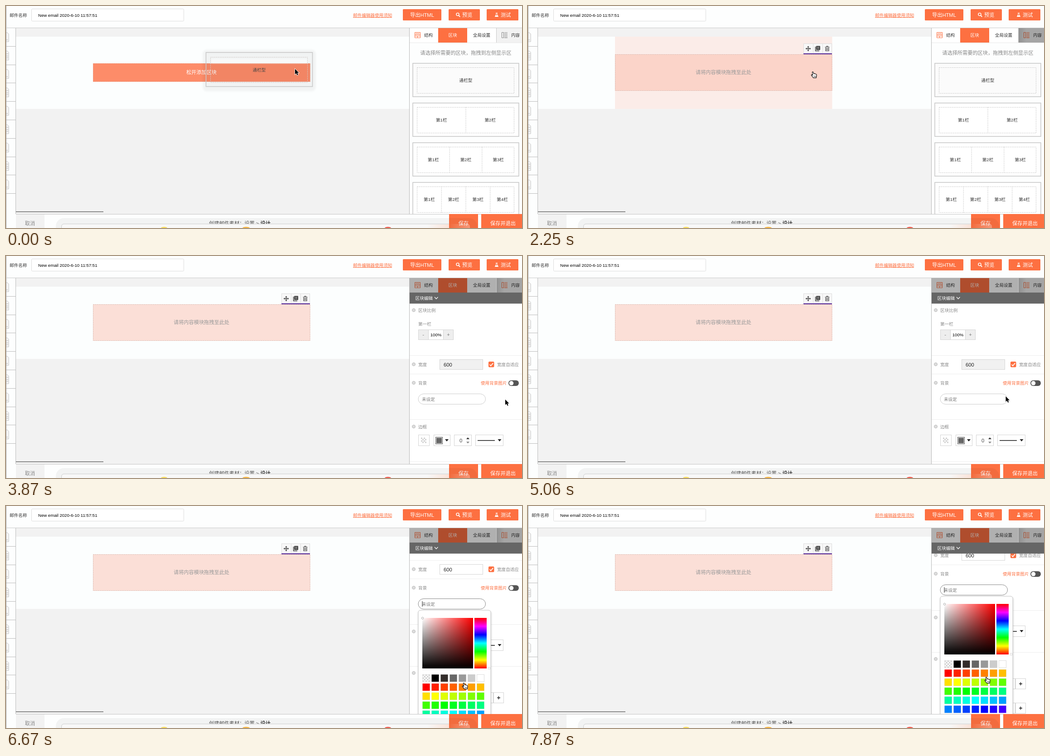
Animation, 1139 px wide and 492 px high, one loop 8 s. Source, as an HTML page:

```html
<!DOCTYPE html>
<html lang="zh-CN">
<head>
<meta charset="utf-8">
<title>邮件编辑器</title>
<style>
html,body{margin:0;width:100%;height:100%;overflow:hidden;background:#fff}
svg{display:block;font-family:"Liberation Sans","Noto Sans CJK SC","Noto Sans CJK",sans-serif}
text{white-space:pre}
</style>
</head>
<body>
<svg id="stage" width="1139" height="492" viewBox="0 0 1139 492"></svg>
<script>
const ORANGE = '#fd7041', S = 9.6, M = 11.2;
const MOVE = 'M0-6.5L2.5-3.5H.8V-.8H3.5V-2.5L6.5 0L3.5 2.5V.8H.8V3.5H2.5L0 6.5L-2.5 3.5H-.8V.8H-3.5V2.5L-6.5 0L-3.5-2.5V-.8H-.8V-3.5H-2.5Z';

const rect = (x, y, w, h, fill, more = '') =>
  `<rect x="${x}" y="${y}" width="${w}" height="${h}" fill="${fill}" ${more}/>`;
const frame = (x, y, w, h, stroke, fill = 'none', more = '') =>
  rect(x + .5, y + .5, w - 1, h - 1, fill, `stroke="${stroke}" ${more}`);
const dashed = (x, y, w, h, stroke = '#c8c8c8') =>
  frame(x, y, w, h, stroke, 'none', 'stroke-dasharray="2.4 1.6"');
const path = (d, fill = 'none', stroke = 'none', more = '') =>
  `<path d="${d}" fill="${fill}" stroke="${stroke}" ${more}/>`;
const text = (x, y, str, size = S, fill = '#333', more = '') =>
  `<text x="${x}" y="${y + size * .37}" font-size="${size}" fill="${fill}" ${more}>${str}</text>`;
const mid = (x, y, str, size, fill, more = '') =>
  text(x, y, str, size, fill, 'text-anchor="middle" ' + more);
const at = (x, y, body) => `<g transform="translate(${x} ${y})">${body}</g>`;
const group = (id, body, more = '') => `<g id="${id}" ${more}>${body}</g>`;
const times = (n, fn) => Array.from({length: n}, (_, i) => fn(i)).join('');
const hline = (x, y, w, fill) => rect(x, y, w, 1, fill);

const defs = `<defs>
<linearGradient id="toRed"><stop stop-color="#fff"/><stop offset="1" stop-color="#f00"/></linearGradient>
<linearGradient id="toBlack" x2="0" y2="1"><stop stop-opacity="0"/><stop offset="1"/></linearGradient>
<linearGradient id="hue" x2="0" y2="1">${times(7, i =>
  `<stop offset="${i / 6}" stop-color="hsl(${360 - i * 60} 100% 50%)"/>`)}</linearGradient>
<linearGradient id="glass"><stop stop-color="#fff" stop-opacity="0"/><stop offset="1" stop-color="#fff" stop-opacity=".3"/></linearGradient>
<linearGradient id="peach"><stop stop-color="#fbd9ca" stop-opacity="0"/><stop offset="1" stop-color="#fbd9ca" stop-opacity=".7"/></linearGradient>
<linearGradient id="shade"><stop stop-opacity=".4"/><stop offset=".3" stop-opacity=".32"/><stop offset="1" stop-opacity=".32"/></linearGradient>
<filter id="soft" x="-20%" y="-20%" width="140%" height="140%"><feGaussianBlur stdDeviation="2"/></filter>
<clipPath id="body">${rect(891, 105, 248, 356, '#000')}</clipPath>
<clipPath id="side">${rect(891, 49, 248, 412, '#000')}</clipPath>
</defs>`;

function topBar() {
  const button = (x, w) => rect(x, 7, w, 25, ORANGE, 'rx="1.5"');
  return rect(0, 0, 1139, 48, '#fdfefe') +
    text(8, 20, '邮件名称') +
    frame(56, 6, 337, 28, '#ddd', '#fff', 'rx="2"') +
    text(71, 20, 'New email 2020-6-10 11:57:51', S, '#000') +
    text(766, 20, '邮件编辑器使用须知', S, ORANGE) + hline(766, 25, 86, ORANGE) +
    button(876, 85) + button(977, 69) + button(1061, 70) +
    mid(918.5, 20, '导出HTML', M, '#fff') +
    text(1007, 20, '预览', M, '#fff') + text(1092, 20, '测试', M, '#fff') +
    '<circle cx="997" cy="18.5" r="3" fill="none" stroke="#fff" stroke-width="1.5"/>' +
    path('M999.3 21l3 3', 'none', '#fff', 'stroke-width="1.8"') +
    path('M1081 15.5h4M1082 15.5v3l-2.6 5h7.2l-2.6-5v-3', 'none', '#fff') +
    path('M1081 20.8h4l1.3 2.6h-6.6z', '#fff');
}

function leftStrip() {
  const icon = i => at(0, 48 + i * 40.8,
    path('M0 11h3l3 3v17H0', '#f6f6f6', '#c4c4c4') +
    path(i % 2 ? 'M0 17h5M0 22h5M0 26h5' : 'M0 27h4', 'none', '#ccc', 'stroke-width="1.5"'));
  return rect(0, 49, 21, 443, '#fdfefe') +
    times(9, icon) + times(10, i => hline(0, Math.round(48 + i * 40.8), 21, '#bbb')) +
    rect(21, 48, 1, 413, '#bbb') + rect(0, 0, 1, 492, '#aaa');
}

function cards() {
  const card = n => {
    const y = 126 + (n - 1) * 88, w = 215 / n;
    return frame(897.5, y + .5, 235, 75, '#c9c9c9', n > 1 ? '#fff' : '#fbfbfb', 'stroke-width="1.6"') +
      dashed(907, y + 10, 215, 58) +
      times(n, i => (i ? path(`M${907.5 + i * w} ${y + 10}v58`, 'none', '#c8c8c8', 'stroke-dasharray="2.4 1.6"') : '') +
        mid(907.5 + (i + .5) * w, y + 38.5, n > 1 ? `第${i + 1}栏` : '通栏型'));
  };
  return mid(1015, 104, '请选择所需要的区块，拖拽到左侧显示区', M, '#888') + [1, 2, 3, 4].map(card).join('');
}

function tabs() {
  const layout = path('M902.5 58.5h12v12h-12zM902.5 63.5h12M902.5 66.5h12M908.5 66.5v4M904 61h9', 'none', ORANGE);
  const list = path('M1094.5 58.5h4v12h-4zM1100 59h7M1100 62h7M1100 65h7M1100 68h7M1100 70.5h7', 'none', 'currentColor');
  return rect(891, 49, 191, 32, '#fff') + rect(954, 49, 64, 32, ORANGE) +
    rect(1082, 49, 57, 32, '#f2f2f2') + rect(1082, 49, 1, 32, '#c8c8c8') + hline(891, 81, 248, '#e8e8e8') +
    layout + group('listIcon', list) +
    text(923, 64.5, '结构') + mid(986, 64.5, '区块', S, '#fff') +
    mid(1050, 64.5, '全局设置') + text(1115, 64.5, '内容') +
    group('shadeLeft', rect(891, 49, 191, 32, '#000', 'fill-opacity=".31"')) +
    group('shadeRight', rect(1083, 49, 56, 32, 'url(#shade)'));
}

function checker(x, y, size, n) {
  const c = size / n;
  return rect(x, y, size, size, '#fff') + times(n * n, i => {
    const col = i % n, row = i / n | 0;
    return (col + row) % 2 ? '' : rect(x + col * c, y + row * c, c, c, '#d0d0d0');
  });
}

function picker() {
  const greys = ['', '#000', '#332d2b', '#666', '#999', '#ccc', '#fff'];
  const swatch = i => {
    const x = 919 + i % 7 * 20, y = 473 + (i / 7 | 0) * 20;
    if (!i) return checker(x, y, 17, 5) + frame(x, y, 17, 17, '#ddd');
    const fill = i < 7 ? greys[i] : `hsl(${(i - 7) * 7.5} 100% 50%)`;
    return frame(x, y, 17, 17, i === 6 ? '#ddd' : 'rgba(120,120,120,.15)', fill);
  };
  return rect(910, 333, 161, 300, '#000', 'rx="5" opacity=".18" filter="url(#soft)"') +
    frame(909.5, 330.5, 161, 300, '#c4c4c4', '#fff', 'rx="5"') +
    rect(919, 348, 112, 112, 'url(#toRed)') + rect(919, 348, 112, 112, 'url(#toBlack)') +
    rect(1034, 348, 27, 112, 'url(#hue)') +
    '<circle cx="919.5" cy="348.5" r="2.2" fill="#fff" stroke="#aaa"/>' +
    frame(1064, 457, 5, 5, '#ddd', '#fff') +
    times(49, swatch);
}

function editor() {
  const label = (y, str) => `<circle cx="900" cy="${y}" r="3.5" fill="#ddd" stroke="#bbb"/>` + text(910, y + .3, str, S, '#888');
  const box = (x, y, w, h, fill = '#fff') => frame(x, y, w, h, '#d4d4d4', fill);
  const down = (x, y) => path(`M${x - 4} ${y - 2}h8l-4 5z`, '#222');
  const plus = y => box(1060, y - 12, 16, 24) + box(1076, y - 12, 23, 24) +
    path(`M1084 ${y}h7M1087.5 ${y - 3.5}v7`, 'none', '#222', 'stroke-width="1.5"');
  const scrolled = label(120, '区块比例') + text(910, 150, '第一栏', S, '#888') +
    box(910, 163, 78, 23) + box(910, 163, 23, 23, '#eee') + box(965, 163, 23, 23, '#eee') +
    mid(921, 174, '-', M, '#777') + mid(949, 174.5, '100%', S, '#000') + mid(976.5, 174, '+', M, '#777') +
    [220, 261, 362, 455].map(y => hline(891, y, 248, '#eee')).join('') +
    label(240, '宽度') + frame(957, 229, 96, 23, '#d4d4d4', '#f1f1f1', 'id="width"') + text(966, 241, '600', M, '#222') +
    rect(1065, 234, 12.5, 12.5, ORANGE, 'rx="2"') +
    path('M1067.5 240.5l2.7 2.9l5-6', 'none', '#fff', 'stroke-width="1.7"') +
    text(1084, 240.5, '宽度自适应', S, '#888') +
    label(281, '背景') + text(1048, 281.5, '使用背景图片', S, ORANGE) +
    rect(1109, 275.5, 23, 12.5, '#555', 'rx="6.2"') + '<circle cx="1115.5" cy="281.8" r="4.8" fill="#fff"/>' +
    frame(909.5, 305, 149.5, 24, '#ccc', '#fff', 'rx="12" id="pill"') + text(918, 317, '未设定', S, '#777') +
    rect(918.5, 311, 1, 12, '#222', 'id="caret"') +
    label(378, '边框') + box(910, 396, 25, 25) + checker(916, 402.5, 12, 4) +
    box(944, 396, 37, 25) + frame(948, 401, 16, 16, '#555', '#fff') + rect(950, 403, 12, 12, '#666') + down(973, 408) +
    box(989, 396, 39, 25) + mid(1004, 409, '0', M, '#444') + path('M1016 406h7l-3.5-4z', '#333') + path('M1016 411.5h7l-3.5 4z', '#888') +
    box(1036, 396, 62, 25) + rect(1041, 408, 38, 1.6, '#222') + down(1089.5, 408) +
    label(470, '边距') + plus(525) + plus(579) + group('picker', picker());
  return rect(891, 81, 248, 380, '#fff') +
    `<g clip-path="url(#body)">${group('scroll', scrolled)}</g>` +
    rect(891, 81, 248, 24.5, '#666') + text(903.5, 93, '区块编辑', S, '#fff') +
    path('M946 91l3.7 4l3.7-4', 'none', '#fff', 'stroke-width="1.2"');
}

function canvas() {
  const tools = rect(608, 83, 63, 22, '#f8f8f8') + frame(608, 83, 63, 22, '#ddd') +
    rect(629, 84, 1, 20, '#ddd') + rect(650, 84, 1, 20, '#ddd') + rect(608, 105, 63, 2, '#5a2ca0') +
    at(618.5, 94.5, path(MOVE, '#444', 'none', 'transform="scale(.92)"')) +
    path('M634.5 90v9.5h8.5', 'none', '#444', 'stroke-width="1.5"') + rect(636, 88.5, 9, 9, '#444', 'rx="1"') +
    path('M638 91.5h5M638 94h5', 'none', '#bbb') +
    path('M655.5 91h10M659 90.5v-1.5h3v1.5M657 92v7.5h7v-7.5M659.3 93v5M661.7 93v5', 'none', '#444', 'stroke-width="1.2"');
  const drag = rect(434, 97, 250, 92, '#000', 'rx="9" opacity=".04" filter="url(#soft)"') +
    rect(452, 118, 214, 9, '#fff', 'opacity=".6" rx="4" filter="url(#soft)"') +
    frame(441, 102.5, 236, 76.5, '#c8c8c8', 'none', 'stroke-width="1.6"') + dashed(451, 113, 215, 57, '#d0c8c5') +
    mid(559, 141.5, '通栏型', S, '#444');
  return rect(22, 49, 868, 412, '#f2f2f2') + rect(22, 68, 868, 160, '#fcfefe') +
    rect(22, 455, 193, 2, '#8a8a8a') +
    group('drop', rect(192, 127, 479.5, 41, '#fd8c69') + dashed(192, 127, 479.5, 41, '#e9a48e') +
      mid(431.5, 147, '松开添加区块', M, '#fff') + drag) +
    rect(192, 68, 479.5, 160, '#fbece8', 'id="row"') +
    group('block', rect(192, 107, 479.5, 81, '#fbd4c9', 'id="fill"') + group('edge', dashed(192, 107, 479.5, 81, '#d8b8af')) +
      mid(431.5, 147, '请将内容模块拖拽至此处', M, '#999')) +
    group('tools', tools);
}

function footer() {
  const glow = (x, w, c) => `<ellipse cx="${x}" cy="492" rx="${w}" ry="2.5" fill="${c}"/>`;
  return rect(22, 461, 1117, 31, '#fdfefe') + hline(22, 461, 1117, '#c4c4c4') + rect(22, 462, 63, 30, '#f2f2f2') +
    rect(978, 461, 64, 31, ORANGE) + rect(1049, 461, 90, 31, ORANGE) +
    mid(53, 481.5, '取消', M, '#888') +
    text(448, 481.5, '创建邮件素材：设置 &gt; <tspan font-weight="bold" fill="#333">设计</tspan>', M, '#555') +
    mid(1010, 481.5, '保存', M, '#fff') + mid(1097, 481.5, '保存并退出', M, '#fff') +
    rect(110, 470, 930, 50, '#000', 'rx="18" opacity=".045"') +
    path('M122.5 492v-3q0-6 6-6H978v9z', '#f8f8f8') + path('M122.5 492v-3q0-6 6-6H978', 'none', '#ccc') +
    rect(930, 484, 48, 8, 'url(#peach)') + path('M978 483h40q6 0 6 6v3h-46z', 'url(#glass)') +
    glow(349, 7, '#f8dc58') + glow(530, 8, '#f5b23c') + glow(843, 7, '#f0584a');
}

const pointers = {
  arrow: path('M0 0V12L2.8 9.5L4.7 13.8L6.8 12.9L4.9 8.7H8.5Z', '#000', '#fff', 'stroke-width="1.5" paint-order="stroke"'),
  move: path(MOVE, '#000', '#fff', 'stroke-width="2" paint-order="stroke"'),
  beam: path('M-2.5-6.5Q0-6.5 0-5V5Q0 6.5-2.5 6.5M2.5-6.5Q0-6.5 0-5M0 5Q0 6.5 2.5 6.5', 'none', '#222'),
  hand: path('M-3.6-6.2C-2.8-7.2-1.6-6.8-1.2-5.6L-.2-2.4C.8-3.2 1.8-2.8 2.2-2C3-2.6 4-2.2 4.3-1.4C5.2-1.6 6-.8 6 .2C6.2 2.8 5.4 4 5.2 6.6H-1.4C-2.2 4.4-4.6 2.8-5.6.8C-5.9-.4-4.4-.9-3.4.2L-2.4 1.2Z',
    '#fff', '#000', 'stroke-width="1.1" stroke-linejoin="round"') + path('M.4 2v2.6M2.2 2v2.6M4 2v2.6', 'none', '#000', 'stroke-width=".7"')
};

const stage = document.getElementById('stage');
stage.innerHTML = defs + rect(0, 0, 1139, 492, '#fdfefe') + canvas() + topBar() + leftStrip() +
  hline(0, 48, 1139, '#c8c8c8') + rect(891, 49, 248, 412, '#fdfefe') +
  `<g clip-path="url(#side)">${cards()}${tabs()}${group('editor', editor())}</g>` +
  rect(890, 49, 1, 412, '#b8b8b8') + footer() +
  group('pointer', Object.keys(pointers).map(k => group(k, pointers[k])).join(''));

const el = {};
stage.querySelectorAll('[id]').forEach(n => el[n.id] = n);
const show = (id, on) => el[id].setAttribute('opacity', +on);
const set = (id, key, v) => el[id].setAttribute(key, v);

// time, pointer, x, y: held until the next entry
const track = [
  [0, 'arrow', 638, 139.5], [300, 'move', 639.5, 142.5], [1200, 'hand', 631, 152.5],
  [2980, 'arrow', 660, 156], [3130, 'arrow', 727, 167], [3280, 'arrow', 798, 194],
  [3430, 'arrow', 945, 250], [3570, 'arrow', 1045, 290], [3720, 'arrow', 1092, 312],
  [3870, 'arrow', 1102, 318], [4020, 'arrow', 1062, 314], [4160, 'beam', 985, 317],
  [4310, 'beam', 926, 318], [4460, 'hand', 1122, 284], [5060, 'arrow', 1054.5, 311],
  [5200, 'beam', 1018, 317], [5350, 'beam', 988, 318], [5640, 'arrow', 992, 338],
  [5780, 'arrow', 1000, 362], [5930, 'arrow', 1007, 382], [6070, 'arrow', 1010, 392],
  [6520, 'hand', 1013, 399], [6970, 'hand', 1013, 397], [7270, 'hand', 1014, 392], [7570, 'hand', 1014, 386]
];
const scrolls = [[0, 0], [6220, 22], [6370, 58], [6520, 86], [6670, 100], [6970, 103],
  [7120, 108], [7270, 114], [7420, 120], [7570, 125], [7720, 129], [7870, 131]];
const hover = [[0, 0], [150, .4], [300, .85], [450, 1], [3280, .5], [3430, 0]];
const held = (list, t) => list.filter(e => e[0] <= t).pop();

function draw(t) {
  const [, kind, x, y] = held(track, t), scroll = held(scrolls, t)[1], open = t >= 5490;
  show('drop', t < 150);
  show('row', held(hover, t)[1]);
  show('block', t >= 150);
  set('block', 'transform', `translate(0 ${t < 450 ? 3 : 0})`);
  set('fill', 'fill', t < 450 ? '#f8c9bb' : t < 3280 ? '#fbd4c9' : t < 3430 ? '#fbdad0' : '#fbdfd7');
  show('edge', t >= 450);
  show('tools', t >= 2250);
  show('shadeRight', t >= 2250);
  set('listIcon', 'color', t < 2250 ? '#888' : ORANGE);
  const panel = t < 2390 ? 0 : t < 2540 ? .5 : 1;
  show('shadeLeft', panel);
  show('editor', panel);
  set('scroll', 'transform', `translate(0 ${-scroll})`);
  set('width', 'fill', scroll ? '#fff' : '#f1f1f1');
  show('picker', open);
  show('caret', open);
  set('pill', 'stroke', open ? '#888' : '#ccc');
  for (const k in pointers) show(k, k === kind);
  set('pointer', 'transform', `translate(${x} ${y})`);
}

function tick() {
  draw(performance.now() % 8000);
  requestAnimationFrame(tick);
}
tick();
</script>
</body>
</html>
```
